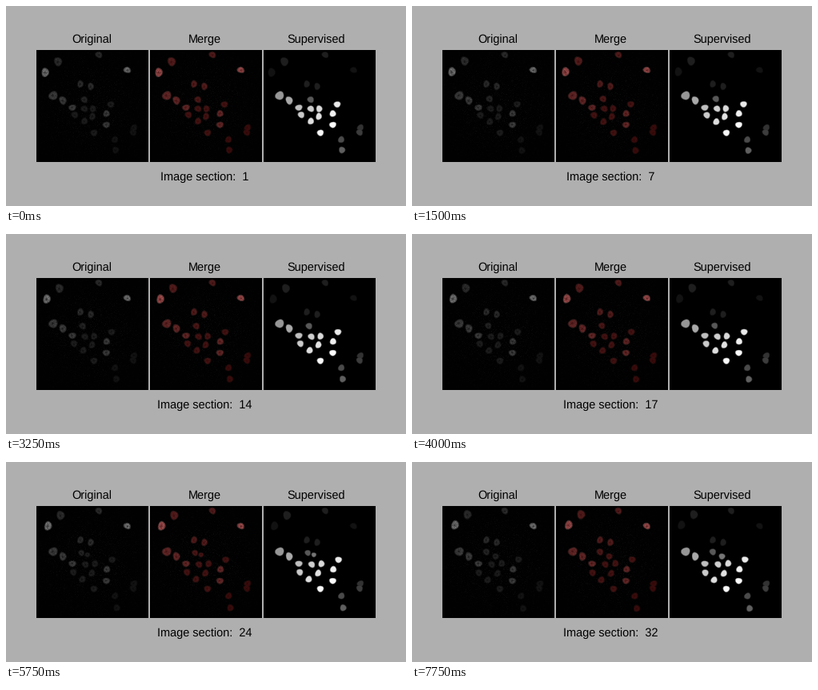
Recreate the animation shown at these times as a matplotlib script. Size 500 by 250 pixels, loop 8 s.

```python
import numpy as np
import matplotlib.pyplot as plt
from matplotlib.animation import FuncAnimation

W, H, DPI = 500, 250, 100
SECTIONS, STEP = 32, 250
TOP, BOTTOM, SIDE = 55, 195, 140
BACK = "#afafaf"
FONT = dict(family="Liberation Sans", size=14.5 * 72 / DPI, color="black",
            ha="center", va="baseline")
plt.rcParams["text.hinting"] = "none"

# title, left edge, shift of the nuclei from the first panel, title centre
PANELS = [("Original", 38, 0, 107.5),
          ("Merge", 180, 142, 248),
          ("Supervised", 322, 283, 388)]


def lineage_grey(x, y):
    """Tracked nuclei get lighter towards the lower right."""
    return min(x + y - 20, 252)


# raw grey, label grey as a function of place, starting places
GROUPS = [
    (100, lambda x, y: 18, [(49, 83), (151.5, 80)]),
    (40, lambda x, y: 30, [(65, 69.5), (116, 61), (93, 97.5), (106, 100.5)]),
    (54, lineage_grey, [(59, 112), (71, 118), (83, 127),
                        (125.5, 134.5), (125.5, 148.5)]),
    (27, lineage_grey, [(98, 128.5), (108.5, 128.5), (131, 123), (86, 136),
                        (98, 144), (108, 138), (110, 158.5)]),
    (18, lambda x, y: 60 + 1.6 * (y - 158), [(136, 167), (159, 158),
                                             (160, 152), (137, 180)]),
]
MOTHER, DAUGHTER = np.array([97.8, 117]), np.array([104.5, 118])
SPLIT = 22

# Tissue flow over the whole series: centre, reach, displacement
PUSHES = np.array([
    [(57, 77), (14, 14), (8, -7)],
    [(97, 115), (6, 6), (-6, -5)],
    [(115, 126), (20, 7), (5, -2.5)],
    [(92, 142), (17, 10), (-4, 4)],
    [(137, 180), (10, 10), (2, 3)],
])


def flow(point):
    centre, reach, shift = PUSHES.transpose(1, 0, 2)
    weight = np.exp(-(((point - centre) / reach) ** 2).sum(axis=1))
    return weight @ shift


def radius(x):
    """Nuclei on the left side are larger."""
    return 3.9 + 1.4 * np.exp(-((x - 58) / 15) ** 2)


def nuclei(i):
    """Yield centre, radius, raw grey and label grey in section i."""
    t = i / (SECTIONS - 1)
    for raw, label, places in GROUPS:
        for x, y in places:
            start = np.array([x, y])
            yield start + t * flow(start), radius(x), raw, label(x, y)

    squeeze = 1 - 0.4 * np.exp(-((i - SPLIT + 2) / 2.5) ** 2)
    yield MOTHER + t * flow(MOTHER), 3.9 * squeeze, 33, 88
    if i >= SPLIT:
        late = min((i - SPLIT + 1) / 6, 1)
        start = DAUGHTER - (4, 3)
        yield start + late * (DAUGHTER - start), 2.4 + 1.3 * late, 30, 118


def draw_cells(i, left, shift):
    """Return raw intensity, label intensity and coverage for one panel."""
    x, y = np.meshgrid(np.arange(left, left + SIDE) + 0.5 - shift,
                       np.arange(TOP, BOTTOM) + 0.5)
    raw, label, cover = np.zeros((3, *x.shape))
    rng = np.random.default_rng(4)
    for (cx, cy), r, grey, tag in nuclei(i):
        stretch = rng.uniform(1, 1.12)
        tilt = rng.uniform(0, np.pi) + 0.01 * i
        dx, dy = x - cx, y - cy
        u = (dx * np.cos(tilt) + dy * np.sin(tilt)) / stretch / r
        v = (dy * np.cos(tilt) - dx * np.sin(tilt)) * stretch / r
        d = np.hypot(u, v) / (1 + 0.05 * np.sin(3 * np.arctan2(v, u)))
        mask = np.clip((1 - d) * r / 1.5 + 0.5, 0, 1)
        soft = np.clip((1 - d) * r / 2 + 0.5, 0, 1)
        spot = np.exp(-((u - 0.1) ** 2 + (v - 0.1) ** 2) / 0.08)
        raw = np.maximum(raw, grey * soft * (1 - 0.5 * spot))
        label = np.maximum(label, tag * mask)
        cover = np.maximum(cover, soft)
    return raw, label, cover


def speckle(i):
    grain = np.random.default_rng(i + 1).normal(size=(SIDE, SIDE))
    y, x = np.mgrid[-1:1:SIDE * 1j, -1:1:SIDE * 1j]
    haze = np.exp(-1.2 * (x ** 2 + y ** 2))
    return grain, np.clip(grain - 0.6, 0, 2) * 7 * haze + 1


def panel_image(i, title, left, shift):
    raw, label, cover = draw_cells(i, left, shift)
    if title == "Supervised":
        rgb = [label] * 3
    else:
        grain, dust = speckle(i)
        raw = raw * (1 + 0.1 * grain) + dust * (1 - cover)
        rgb = [raw] * 3
        if title == "Merge":
            side = raw * (1 - 0.35 * cover)
            rgb = [raw + 38 * cover, side, side]
    return np.clip(np.dstack(rgb), 0, 255).astype(np.uint8)


fig = plt.figure(figsize=(W / DPI, H / DPI), dpi=DPI, facecolor=BACK)
ax = fig.add_axes([0, 0, 1, 1])
ax.axis("off")

views = []
for title, left, shift, centre in PANELS:
    views.append(ax.imshow(panel_image(0, title, left, shift),
                           extent=(left, left + SIDE, BOTTOM, TOP),
                           interpolation="nearest", aspect="auto"))
    ax.text(centre, 46, title, **FONT)
caption = ax.text(248, 218, "", **FONT)
ax.set_xlim(0, W)
ax.set_ylim(H, 0)


def update(i):
    for view, (title, left, shift, _) in zip(views, PANELS):
        view.set_data(panel_image(i, title, left, shift))
    caption.set_text(f"Image section:  {i + 1}")
    return [*views, caption]


anim = FuncAnimation(fig, update, frames=SECTIONS, interval=STEP,
                     repeat=True, repeat_delay=0)
plt.show()
```
